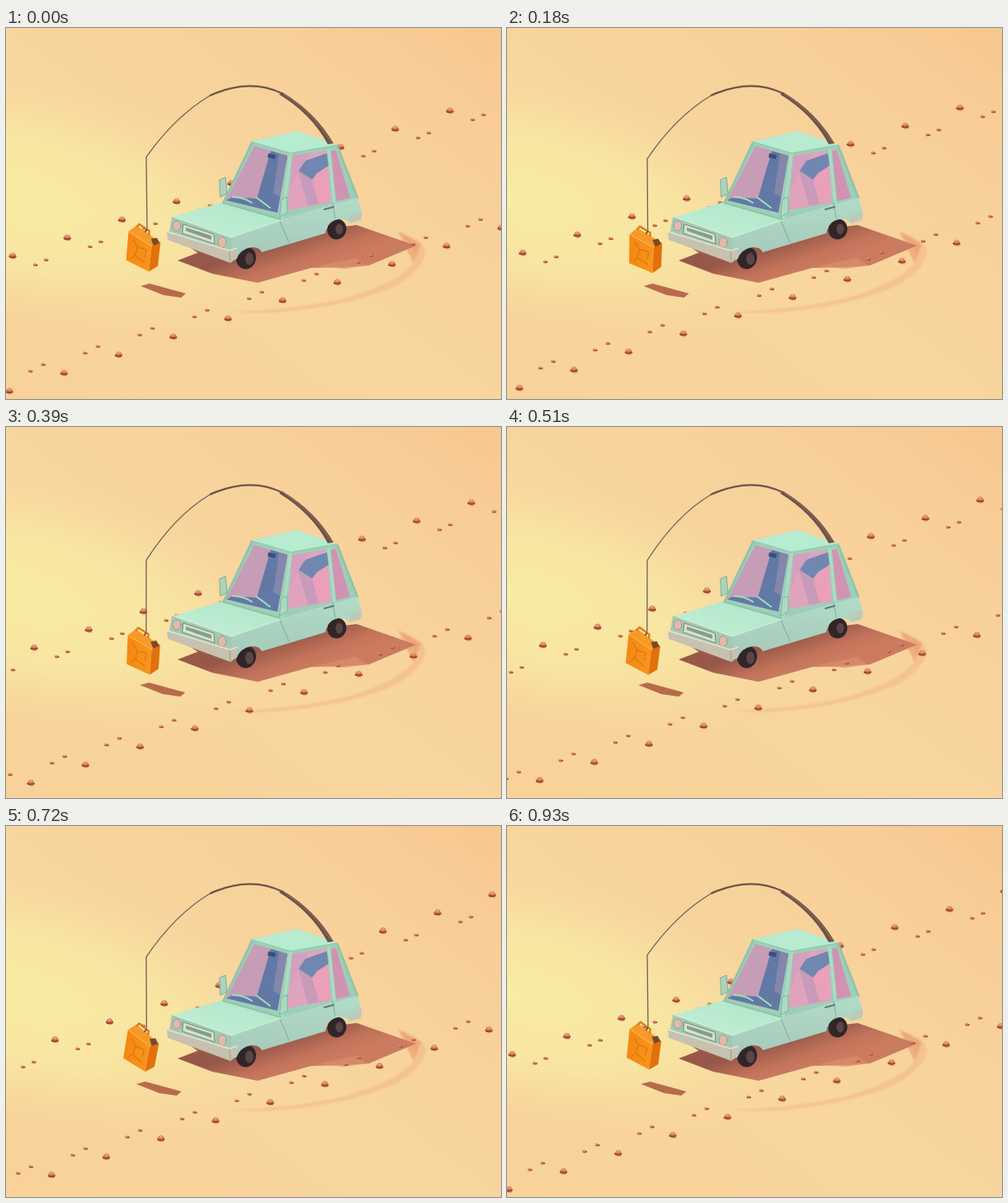
Animation of 600x450 px, one loop 960 ms. Source, as an HTML page:

```html
<!DOCTYPE html>
<html lang="en">
<head>
<meta charset="utf-8">
<title>Desert drive</title>
<style>
  html, body { margin: 0; width: 100%; height: 100%; overflow: hidden; background: #f8d39a; }
  svg { display: block; width: 600px; height: 450px; }
</style>
</head>
<body>
<svg viewBox="0 0 600 450">
  <defs>
    <linearGradient id="sand" x1="0" y1="1" x2="1" y2="0">
      <stop offset="0" stop-color="#f8d298"/>
      <stop offset=".45" stop-color="#f8d69e"/>
      <stop offset=".75" stop-color="#f8d09a"/>
      <stop offset="1" stop-color="#f7c890"/>
    </linearGradient>
    <radialGradient id="glow">
      <stop offset="0" stop-color="#f8eca2"/>
      <stop offset=".55" stop-color="#f8e7a2" stop-opacity=".85"/>
      <stop offset="1" stop-color="#f8dca0" stop-opacity="0"/>
    </radialGradient>
    <linearGradient id="shade" gradientUnits="userSpaceOnUse" x1="343" y1="257" x2="357" y2="298">
      <stop offset="0" stop-color="#985849"/>
      <stop offset=".6" stop-color="#c2735a"/>
      <stop offset="1" stop-color="#cb7c60"/>
    </linearGradient>
    <linearGradient id="hood" x1="0" y1="1" x2="1" y2="0">
      <stop offset="0" stop-color="#c4efd6"/>
      <stop offset="1" stop-color="#aee6c8"/>
    </linearGradient>
    <linearGradient id="side" x1="0" y1="0" x2="0" y2="1">
      <stop offset="0" stop-color="#b2dcc8"/>
      <stop offset="1" stop-color="#a5c9b9"/>
    </linearGradient>
    <linearGradient id="face">
      <stop offset="0" stop-color="#f58712"/>
      <stop offset="1" stop-color="#f7951c"/>
    </linearGradient>
    <filter id="soft"><feGaussianBlur stdDeviation="1"/></filter>
    <g id="boulder">
      <ellipse cx="1" cy="3.3" rx="3" ry="1.1" fill="#e4a57a"/>
      <ellipse cy="1" rx="4.6" ry="2.2" fill="#a04029"/>
      <path d="M-4 .5Q-3-3.6 .2-3.6Q3.2-3.6 4 .5Q0 2-4 .5" fill="#d27a59"/>
      <path d="M-2.3-1Q-1.3-3.2 .5-3Q1.8-2.7 2-1Z" fill="#efa98c"/>
    </g>
    <g id="pebble">
      <ellipse cx=".8" cy=".6" rx="2.9" ry="1.4" fill="#b0523a"/>
      <ellipse cx="-.2" cy="-.4" rx="1.9" ry="1.1" fill="#dc8a67"/>
    </g>
  </defs>

  <rect width="600" height="450" fill="url(#sand)"/>
  <ellipse rx="370" ry="150" transform="translate(10 205) rotate(13)" fill="url(#glow)"/>

  <g filter="url(#soft)">
    <path d="M474 247Q503 255 509 270Q508 291 474 312Q420 337 330 345Q295 347 274 344Q340 343 410 328Q484 306 496 281Q498 266 474 247Z" fill="#f0ab78" opacity=".4"/>
    <path d="M476 247L503 262L494 285L486 269Z" fill="#e98e66" opacity=".55"/>
  </g>
  <path d="M208 282L270 258L425 239L497 264L440 288L408 290L370 291L305 309L250 298Z" fill="url(#shade)"/>
  <path d="M376 289L424 279L438 288L410 292Z" fill="#dc8d6c" opacity=".7"/>
  <path id="canShadow" d="M162 313L173 310L217 322L211 327L190 324Z" fill="#b86a4c"/>

  <g id="stones"></g>

  <g id="car" stroke-linejoin="round" stroke-linecap="round">
    <path d="M224 267L274 282L262 283L236 275Z" fill="#9b5a4b"/>
    <!-- cabin -->
    <path d="M297 138L352 125L402 143L427 207L396 224L333 233L262 213Z" fill="#9dcfb8"/>
    <path d="M301 143L341 155L329 224L267 209Z" fill="#c79cb6"/>
    <path d="M321 149L341 155L329 224L267 209L275 205L304 207Z" fill="#6179a4"/>
    <path d="M331 152L341 155L332 205L324 200Z" fill="#8686ab"/>
    <path d="M318 152L327 154L326 159L317 157Z" fill="#36507c"/>
    <path d="M347 155L388 149L394 212L341 221Z" fill="#e0a3be"/>
    <path d="M354 173L363 161L389 152L391 167L377 176L371 184Z" fill="#7087b0"/>
    <path d="M371 184L391 167L393 207L379 213Z" fill="#eba0ba"/>
    <path d="M347 155L368 152L352 178L344 198Z" fill="#d3a0bd"/>
    <path d="M354 173L371 184L379 213L366 216Z" fill="#c89bba"/>
    <path d="M394 149L400 148L417 206L400 210Z" fill="#d193b2"/>
    <path d="M391 148L398 211M345 153L335 230" fill="none" stroke="#a9dcc2" stroke-width="3.6"/>
    <path d="M402 144L426 206M298 140L264 211" fill="none" stroke="#92c2ab" stroke-width="2.6"/>
    <path d="M297 138L352 125L402 142L345 152Z" fill="#b7ecd0"/>
    <path d="M297 138L345 152L402 142" fill="none" stroke="#98c8b0" stroke-width="1.6"/>
    <path d="M275 205Q288 205 298 212M304 206L320 218" fill="none" stroke="#a4dfb9" stroke-width="2"/>
    <!-- wheels and body -->
    <g fill="#30262a">
      <ellipse cx="291" cy="279" rx="12" ry="13.5" transform="rotate(15 291 279)"/>
      <ellipse cx="401" cy="244" rx="11.5" ry="12.5" transform="rotate(15 401 244)"/>
    </g>
    <g fill="#5a4644">
      <ellipse cx="295" cy="280" rx="5" ry="7.5"/>
      <ellipse cx="404" cy="244" rx="4.5" ry="6.5"/>
    </g>
    <path d="M272 253L334 232L396 214L426 206L431 223L430 233L417 237Q413 231 403 232Q390 234 387 249L310 272Q307 265 297 266Q284 268 279 281L274 281Z" fill="url(#side)"/>
    <path d="M203 229L263 211L333 233L273 254Z" fill="url(#hood)"/>
    <path d="M263 212L333 232" stroke="#8cc4a8" stroke-width="2"/>
    <path d="M332 234L343 260M396 213L399 231" fill="none" stroke="#80a99c" stroke-width="1"/>
    <path d="M201 229L273 254L274 273L198 247Z" fill="#a3c9b5"/>
    <path d="M203 229L273 254L334 233" fill="none" stroke="#d0f3df" stroke-width="1"/>
    <path d="M215 238L252 250L253 262L214 249Z" fill="#dbe0c4" stroke="#6b8a7f"/>
    <path d="M218 242L249 252L249 257L218 246Z" fill="#7f9f90"/>
    <g fill="#e5b9a6" stroke="#949f91">
      <ellipse cx="207" cy="240" rx="5" ry="6"/>
      <ellipse cx="262" cy="260" rx="5" ry="6.5"/>
    </g>
    <path d="M195 247L271 270L280 267L280 279L272 285L196 257Z" fill="#c6c2af"/>
    <path d="M195 247L271 270L280 267" fill="none" stroke="#e6e3ca" stroke-width="1.5"/>
    <path d="M272 285L271 271" stroke="#98a091"/>
    <path d="M416 228L431 222L431 231L418 237Z" fill="#bfc9b7"/>
    <path d="M386 220L397 217" stroke="#5b7d73" stroke-width="2.2"/>
    <path d="M259 184L266 181L268 201L260 205Z" fill="#abd3bd" stroke="#82aa97"/>
    <path d="M334 208L341 205L341 224L332 229Z" fill="#a9dcc3" stroke="#84b19c"/>
  </g>

  <!-- rod -->
  <path d="M390 141Q370 104 331 80.5L335 78Q375 102 397 140Z" fill="#6f5248"/>
  <path d="M394 138Q373 104 336 79.5" fill="none" stroke="#a07d69" stroke-width=".8"/>
  <path d="M335 79.5Q295 60 247 82" fill="none" stroke="#6d5449" stroke-width="2.4"/>
  <path id="line" fill="none" stroke="#735e58" stroke-width="1.3"/>

  <!-- can, hung from its own origin -->
  <g id="can" stroke-linejoin="round">
    <path d="M-22 5L-13-3L18 14L8 20Z" fill="#f59a2a"/>
    <path d="M-22 5L8 20L8 51L-21 40Z" fill="url(#face)"/>
    <path d="M8 20L18 14L18 43L8 51Z" fill="#e2700d"/>
    <path d="M-22 5L8 20" fill="none" stroke="#ffb548"/>
    <path d="M-16 14L-9 23L2 25M-9 23L-11 33L2 41M-11 33L-16 38M2 25L1 34" fill="none" stroke="#dc760f" stroke-width="1.2"/>
    <path d="M-13-1L-10-5L3 2L3 7" fill="none" stroke="#df7c15" stroke-width="2.4"/>
    <path d="M6 11L13 9L17 15L10 19Z" fill="#7a4a28"/>
    <path d="M0 0L-2 4" stroke="#6d5650" stroke-width="2"/>
  </g>
</svg>
<script>
const LOOP = 960, STEP = 30;
const SPACING = { x: 66.25, y: -22 };
const $ = id => document.getElementById(id);

// One repeat of the roadside, tiled along the direction of travel.
const tile = [
  ["boulder", 4, 440], ["pebble", 44.5, 408], ["pebble", 29, 416],
  ["boulder", 8, 276], ["pebble", 48, 281], ["pebble", 35, 287]
];
let stones = "";
for (let k = 10; k >= -2; k--)
  for (const [kind, x, y] of tile)
    stones += `<use href="#${kind}" x="${x + k * SPACING.x}" y="${y + k * SPACING.y}"/>`;
$("stones").innerHTML = stones;

const move = (id, x, y, angle = 0) =>
  $(id).setAttribute("transform", `translate(${x} ${y}) rotate(${angle})`);

function draw(now) {
  const p = Math.floor(now % LOOP / STEP) * STEP / LOOP;
  const turn = 2 * Math.PI * p;
  const swing = Math.sin(turn);
  const travel = p - 0.024 * swing;
  const bob = 2.7 - 2.7 * Math.cos(turn + 0.15);
  const hook = { x: 171 - 0.6 * (1 - Math.cos(turn)), y: 244 + bob };

  move("stones", travel * SPACING.x, travel * SPACING.y);
  move("canShadow", 4 * Math.sin(turn + 0.4) - 0.5, 0);
  move("can", hook.x, hook.y, 6.5 - 4.5 * swing);
  $("line").setAttribute("d",
    `M248 81.5Q205 107 170 ${156.5 + bob}L${hook.x} ${hook.y}`);
  requestAnimationFrame(() => draw(performance.now()));
}
draw(0);
</script>
</body>
</html>
```
